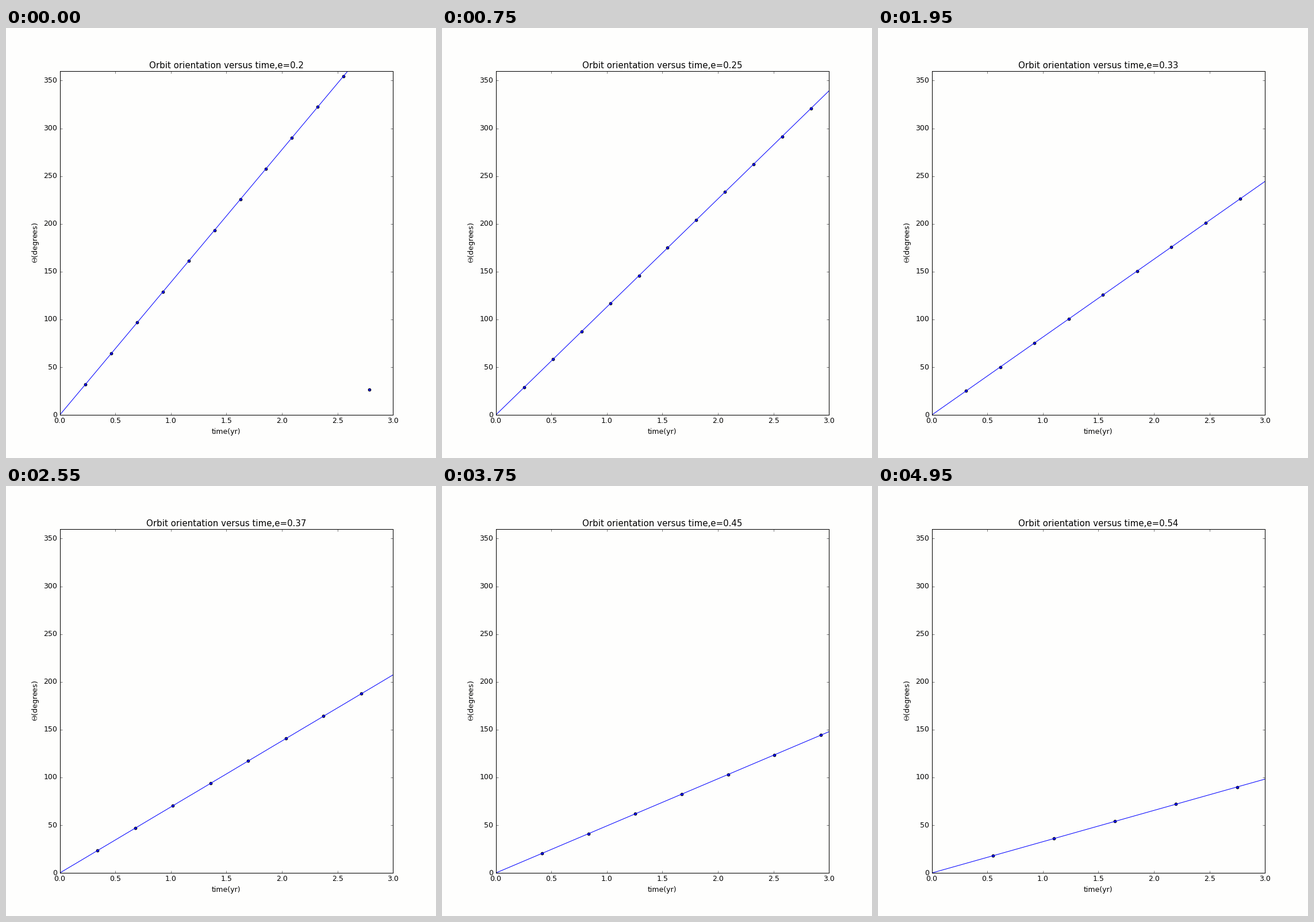
Recreate the animation shown at these times as a matplotlib script. Size 748 by 748 pixels, loop 5100 ms.

```python
import numpy as np
import matplotlib.pyplot as plt
from matplotlib.animation import FuncAnimation

plt.style.use("classic")
plt.rcParams["font.sans-serif"] = ["DejaVu Sans"]

BACK = "#fefefd"
T_MAX = 3.0
# The sweep runs in steps of 0.01 and leaves out one value.
ECC = [n / 100 for n in range(20, 55) if n != 46]

# Orbit period (yr) and precession per orbit (degrees) at a few eccentricities
KNOTS = np.array([0.20, 0.25, 0.29, 0.37, 0.42, 0.50, 0.54])
PERIOD = np.array([0.2322, 0.2579, 0.2812, 0.3396, 0.3853, 0.4840, 0.5498])
SHIFT = np.array([32.23, 29.17, 27.00, 23.46, 21.59, 19.13, 18.00])

# Kepler scaling leaves a slowly varying factor that a cubic follows well.
period_fit = np.polyfit(KNOTS, PERIOD * (1 - KNOTS) ** 1.5, 3)
shift_fit = np.polyfit(KNOTS, SHIFT, 3)


def orbit(e):
    period = np.polyval(period_fit, e) / (1 - e) ** 1.5
    return period, np.polyval(shift_fit, e)


fig = plt.figure(figsize=(10, 10), dpi=74.8, facecolor=BACK)
ax = fig.add_axes([0.125, 0.1, 0.775, 0.8], facecolor=BACK)
ax.set_xlim(0, T_MAX)
ax.set_ylim(0, 360)
ax.set_xticks(np.arange(0, 3.1, 0.5))
ax.set_yticks(range(0, 351, 50))
ax.set_xlabel("time(yr)")
ax.set_ylabel(r"$\Theta$(degrees)")
title = ax.set_title("")
line, = ax.plot([], [], "b-", lw=1)
dots = ax.scatter([], [], s=20, c="b", edgecolors="k", linewidths=1)


def draw(i):
    e = ECC[i]
    period, shift = orbit(e)
    k = np.arange(1, int(T_MAX / period) + 1)
    dots.set_offsets(np.column_stack([k * period, k * shift % 360]))
    line.set_data([0, T_MAX], [0, T_MAX * shift / period])
    title.set_text(f"Orbit orientation versus time,e={e}")
    return line, dots, title


anim = FuncAnimation(fig, draw, frames=len(ECC), interval=150,
                     repeat=True, repeat_delay=0, blit=False)
plt.show()
```
